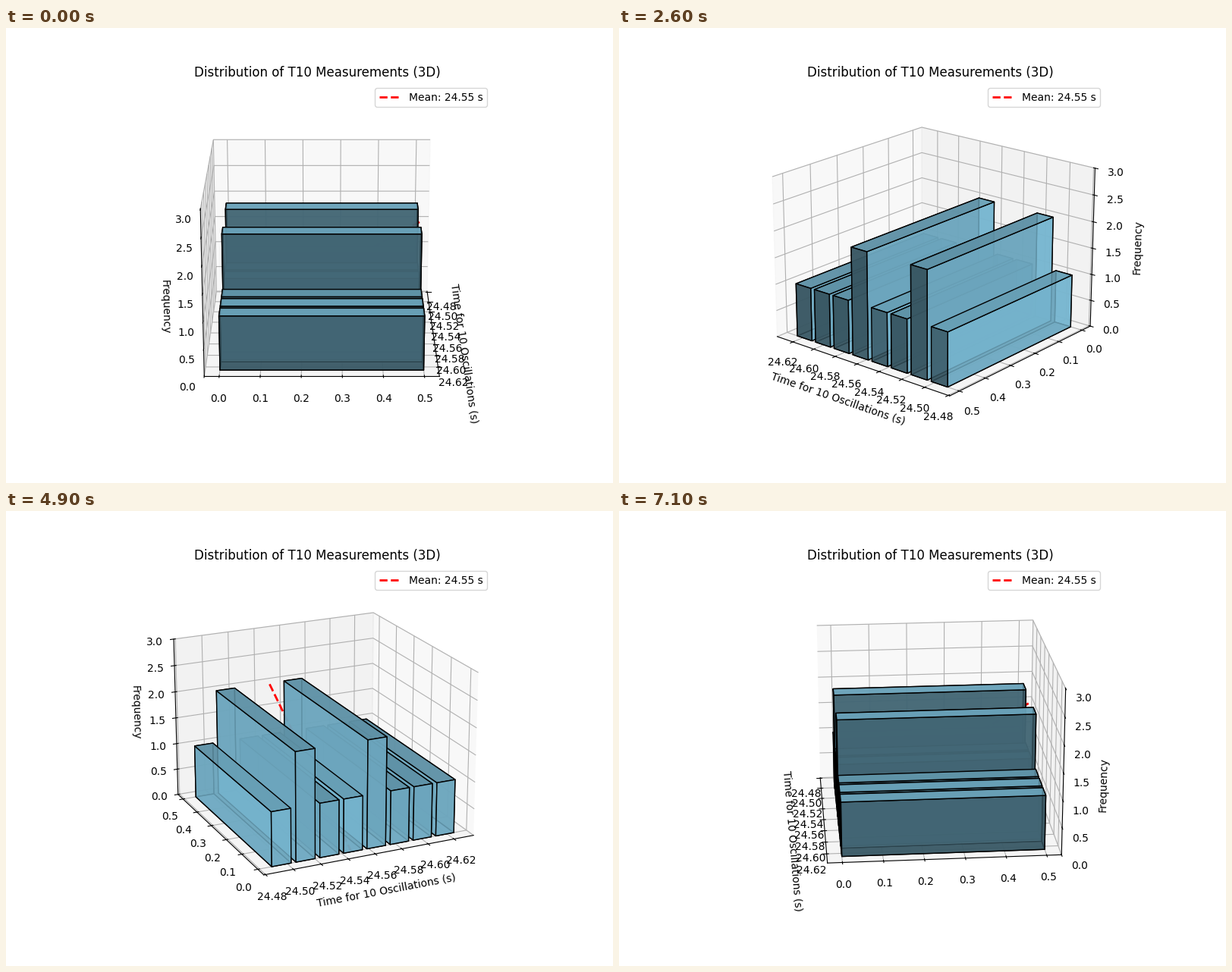
Animation, 800 px wide and 600 px high, one loop 7.2 s. Source, as a matplotlib script:

```python
import numpy as np
import matplotlib.pyplot as plt
from matplotlib.animation import FuncAnimation

FRAMES = 72
INTERVAL = 100  # ms
DEPTH = 0.5

times = np.array([24.48, 24.50, 24.51, 24.53, 24.54,
                  24.56, 24.56, 24.57, 24.60, 24.62])
mean = times.mean()
counts, edges = np.histogram(times, bins=8)
centers = (edges[:-1] + edges[1:]) / 2
bin_width = edges[1] - edges[0]

fig = plt.figure(figsize=(8, 6), dpi=100)
ax = fig.add_subplot(111, projection="3d")

ax.bar3d(centers, np.zeros(len(counts)), np.zeros(len(counts)),
         0.8 * bin_width, DEPTH, counts,
         color="skyblue", edgecolor="black", alpha=0.8)
ax.plot([mean, mean], [0, DEPTH], [0, counts.max()],
        color="red", linestyle="--", linewidth=2,
        label=f"Mean: {mean:.2f} s")

ax.set_title("Distribution of T10 Measurements (3D)")
ax.set_xlabel("Time for 10 Oscillations (s)")
ax.set_zlabel("Frequency")
ax.set_zlim(0, counts.max() + 1)
ax.legend(loc="upper right")


def rotate(frame):
    ax.view_init(elev=20, azim=frame * 360 / FRAMES)
    return []


anim = FuncAnimation(fig, rotate, frames=FRAMES, interval=INTERVAL,
                     blit=False, repeat=True)
plt.show()
```
